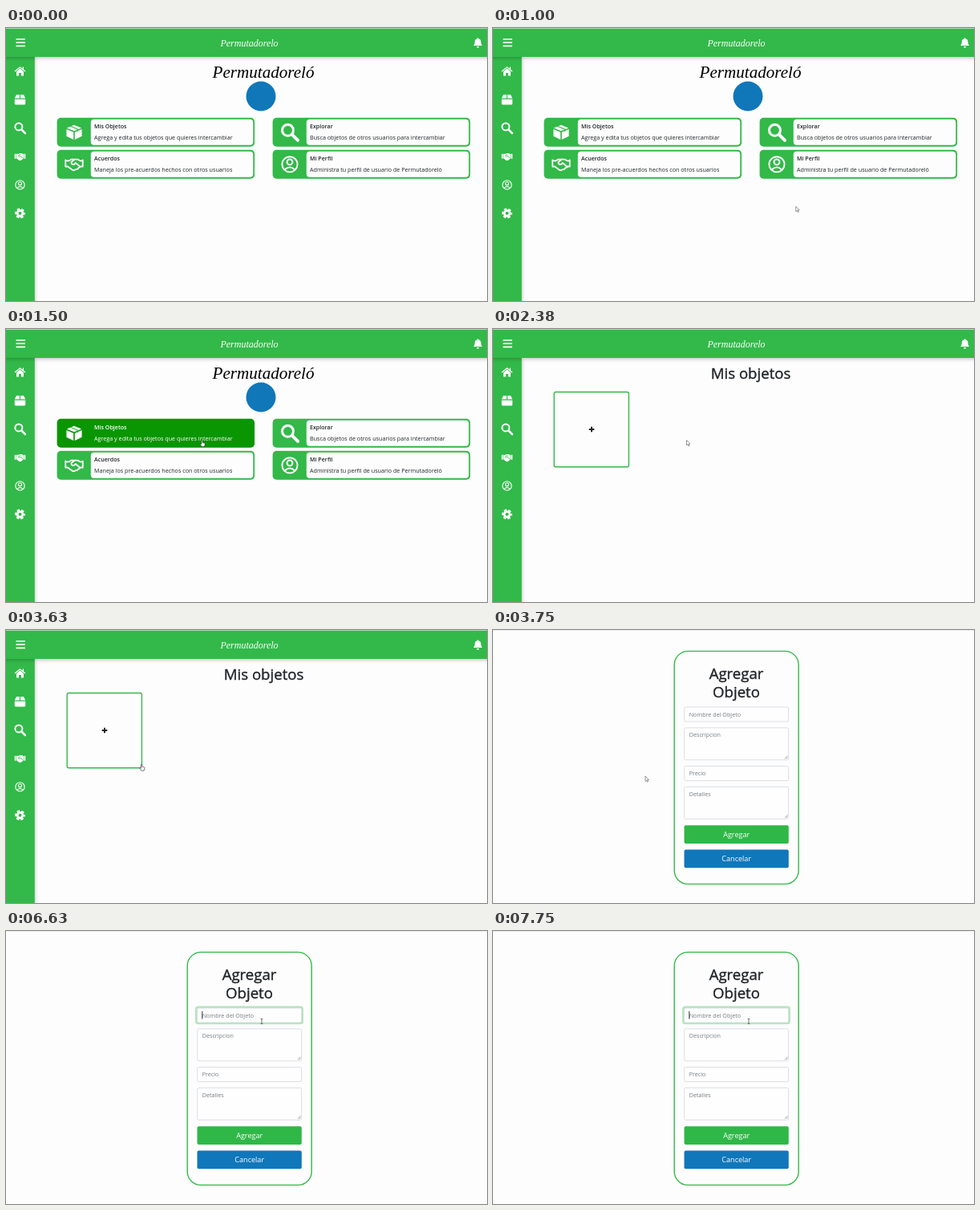
An HTML page that plays this animation: 600x340 px, repeating every 8 s.

```html
<!DOCTYPE html>
<html lang="es">
<head>
<meta charset="utf-8">
<title>Permutadorelo</title>
<style>
  html, body { margin: 0; width: 100%; height: 100%; overflow: hidden; background: #fdfdfd; }
  svg { display: block; width: 100%; height: 100%; }
  text { font: 7.2px "Open Sans", "Noto Sans", sans-serif; fill: #212529; }
  .brand { font: italic 21.1px "Liberation Serif", serif; fill: #000; text-anchor: middle; }
  .brand.small { font-size: 12px; fill: #fff; }
  .heading { font-size: 18.6px; text-anchor: middle; stroke: #212529; stroke-width: .4; }
  .label { font-size: 7.1px; font-weight: 600; }
  .hint { fill: #747b82; }
  .button { font-size: 9.1px; fill: #fff; text-anchor: middle; }
  .bar, .card { fill: #32b948; }
  .panel { fill: #fdfdfd; }
  .hover .card { fill: #0a9602; }
  .hover .panel { fill: none; }
  .hover text { fill: #fff; }
  .outline { fill: #fdfdfd; stroke: #32b948; stroke-width: 1.4; }
  .field { fill: #fefefe; stroke: #d3d7e0; stroke-width: .8; }
  .solid { fill: #fff; }
  .line { fill: none; stroke: #fff; stroke-width: 2; stroke-linejoin: round; stroke-linecap: round; }
</style>
</head>
<body>
<svg viewBox="0 0 600 340">
  <defs>
    <filter id="shadow" x="-20%" y="-20%" width="140%" height="140%">
      <feDropShadow dx="0" dy="1" stdDeviation="2.5" flood-opacity=".28"/>
    </filter>
    <!-- Icons are drawn around 0,0 in a 24 unit box -->
    <g id="home">
      <path class="line" d="M-11 0L0-9L11 0M7-9V-4"/>
      <path class="solid" d="M-8 1L0-6L8 1V10H2.5V4H-2.5V10H-8Z"/>
    </g>
    <g id="box">
      <path class="solid" d="M-8-11H-1V-3H-12ZM1-11H8L12-3H1ZM-12-1H12V9Q12 11 10 11H-10Q-12 11-12 9Z"/>
    </g>
    <g id="cube">
      <path class="solid" d="M0-11L11-6.5L0-2L-11-6.5ZM-11.5-4.5L-1-.2V11L-11.5 6ZM11.5-4.5L1-.2V11L11.5 6Z"/>
      <path d="M-5.5-9L5.5-4.3V-1" fill="none" stroke="#32b948" stroke-width="1.3"/>
    </g>
    <g id="search">
      <circle class="line" cx="-2.5" cy="-2.5" r="7" style="stroke-width:3"/>
      <path class="line" d="M3 3L10 10" style="stroke-width:4"/>
    </g>
    <g id="shakeSolid">
      <path class="solid" d="M-12-6H-9V5H-12ZM9-6H12V5H9ZM-8-6H-3L-1-7H4L8-5V4L2 9H-2L-8 4Z"/>
      <path d="M1-5L-4-1Q-2 2 1-1L7 4" fill="none" stroke="#32b948" stroke-width="1.5"/>
    </g>
    <g id="shake">
      <path class="line" d="M-12-6V3H-9L-2 8Q0 9 2 7L4 7L6 5L8 4L9 3H12V-6M-12-5H-7L-4-7H0M12-5H8L5-7H1L-4-3Q-4 1 0 0L2-2L8 3"/>
    </g>
    <g id="user">
      <circle class="line" r="10"/><circle class="line" cy="-3" r="3.6"/>
      <path class="line" d="M-6.5 7Q0 .5 6.5 7"/>
    </g>
    <g id="gear">
      <circle r="6" fill="none" stroke="#fff" stroke-width="5"/>
      <circle r="9.5" fill="none" stroke="#fff" stroke-width="4" stroke-dasharray="6 3.95" stroke-dashoffset="3"/>
    </g>
    <g id="bell">
      <path class="solid" d="M-10 7Q-7 4-7-2Q-7-8-1-9V-11H1V-9Q7-8 7-2Q7 4 10 7ZM-3 9H3Q2 12 0 12Q-2 12-3 9Z"/>
    </g>
    <g id="arrow">
      <path d="M0 0V6.4L1.5 5L2.6 7.3L3.6 6.8L2.5 4.7H4.4Z" fill="#fff" stroke="#555" stroke-width=".6"/>
    </g>
    <g id="hand">
      <path d="M-.7.5Q0-.5.7.5V3L3.3 3.6Q4 4 3.8 5L3 8H-.3L-2.4 5Q-2.2 4-.7 5Z" fill="#fff" stroke="#222" stroke-width=".6"/>
    </g>
    <g id="beam">
      <path d="M-1.3-3H1.3M0-3V3M-1.3 3H1.3" fill="none" stroke="#555" stroke-width=".8"/>
    </g>
  </defs>
  <rect width="600" height="340" fill="#fdfdfd"/>
  <g id="menuPage">
    <text class="brand" x="321" y="62">Permutadoreló</text>
    <circle cx="318" cy="85" r="18.5" fill="#1077b9"/>
  </g>
  <g id="objectsPage">
    <text class="heading" x="321.5" y="62">Mis objetos</text>
    <rect class="outline" x="76.2" y="78.5" width="93.2" height="93.2" rx="2"/>
    <path d="M119.7 125H126.3M123 121.7V128.3" stroke="#212529" stroke-width="2"/>
  </g>
  <g id="frame">
    <rect class="bar" y="36" width="35.8" height="310" filter="url(#shadow)"/>
    <rect class="bar" x="-10" y="-5" width="620" height="41" filter="url(#shadow)"/>
    <path d="M12.5 14H24M12.5 18.2H24M12.5 22.4H24" stroke="#fff" stroke-width="1.7"/>
    <text class="brand small" x="303.5" y="23">Permutadorelo</text>
  </g>
  <g id="formPage">
    <rect class="outline" x="226.2" y="26.4" width="155" height="290" rx="17"/>
    <text class="heading" x="303.5" y="61.3">Agregar</text>
    <text class="heading" x="303.5" y="84">Objeto</text>
    <rect id="glow" x="237.3" y="94.7" width="132.4" height="20.2" rx="2.5" fill="none" stroke="#b4e6bd" stroke-width="2.6"/>
  </g>
  <path d="M0 .5H600" stroke="#e4e6e5" opacity=".7"/>
  <path id="caret" d="M244.8 99.8V109.6" stroke="#222" stroke-width=".9"/>
  <use id="pointer"/>
</svg>
<script>
const LOOP = 8000, POINTER_AT = 500, OBJECTS_AT = 2370, FORM_AT = 3740, FOCUS_AT = 4500;
const $ = id => document.getElementById(id);
const add = (parent, markup) => parent.insertAdjacentHTML('beforeend', markup);
const icon = (id, x, y, size) =>
  `<use href="#${id}" transform="translate(${x} ${y}) scale(${size / 24})"/>`;

['home', 'box', 'search', 'shakeSolid', 'user', 'gear'].forEach((id, i) =>
  add($('frame'), icon(id, 17.5, 53.8 + i * 35.4, id === 'search' ? 15.5 : 13.5)));
add($('frame'), icon('bell', 588.6, 18.2, 13));

const cards = [
  [63.6, 111.8, 'cube', 20, 'Mis Objetos', 'Agrega y edita tus objetos que quieres intercambiar'],
  [332.6, 111.8, 'search', 24, 'Explorar', 'Busca objetos de otros usuarios para intercambiar'],
  [63.6, 151.8, 'shake', 21.5, 'Acuerdos', 'Maneja los pre-acuerdos hechos con otros usuarios'],
  [332.6, 151.8, 'user', 23, 'Mi Perfil', 'Administra tu perfil de usuario de Permutadoreló']
].map(([x, y, id, size, label, detail]) => {
  add($('menuPage'), `<g>
    <rect class="card" x="${x}" y="${y}" width="246.5" height="36" rx="5"/>
    <rect class="panel" x="${x + 42.2}" y="${y + 2}" width="202.5" height="32" rx="4"/>
    ${icon(id, x + 21.4, y + 18, size)}
    <text class="label" x="${x + 46.4}" y="${y + 13.5}">${label}</text>
    <text x="${x + 46.4}" y="${y + 27.5}">${detail}</text></g>`);
  return { x, y, w: 246.5, h: 36, node: $('menuPage').lastElementChild };
});

const fields = [
  ['Nombre del Objeto', 96, 18], ['Descripcion', 121.8, 40],
  ['Precio', 169.6, 18], ['Detalles', 195.3, 40]
].map(([hint, y, h]) => {
  const grip = h > 20 ? `<path d="M364 ${y + h - 1.5}l3.5-3.5M366 ${y + h - 1.5}l1.5-1.5" stroke="#777" stroke-width=".7"/>` : '';
  add($('formPage'), `<rect class="field" x="238.6" y="${y}" width="130" height="${h}" rx="1.8"/>
    ${grip}<text class="hint" x="244.7" y="${y + 11.6}">${hint}</text>`);
  return { x: 238, y, w: 131, h };
});

[['Agregar', 243.3, '#2fb848'], ['Cancelar', 273.6, '#1077ba']].forEach(([label, y, color]) =>
  add($('formPage'), `<rect x="238.5" y="${y}" width="130.3" height="22.6" rx="2" fill="${color}"/>
    <text class="button" x="303.7" y="${y + 14.7}">${label}</text>`));

// Pointer stops: time, x, y
const stops = [
  [0, 377.8, 222.2], [1050, 377.8, 222.2], [1500, 244.5, 138.5], [OBJECTS_AT, 244.5, 138.5],
  [2380, 241.5, 138.5], [2750, 205, 210], [3200, 145, 150], [3500, 145, 150],
  [3750, 190, 182], [3880, 245, 160], [4250, 319, 112.5], [LOOP, 319, 112.5]
];
const addBox = { x: 76, y: 78, w: 94, h: 94 };
const inside = (b, x, y) => x >= b.x && x <= b.x + b.w && y >= b.y && y <= b.y + b.h;
const show = (id, on) => $(id).style.display = on ? '' : 'none';

function pointerAt(t) {
  const i = stops.findIndex(s => t < s[0]);
  const [t0, x0, y0] = stops[i - 1], [t1, x1, y1] = stops[i];
  const k = (t - t0) / (t1 - t0), e = k * k * (3 - 2 * k);
  return [x0 + (x1 - x0) * e, y0 + (y1 - y0) * e];
}

function caretOn(t) {
  return t >= FOCUS_AT && t < 5000 || t >= 5500 && t < 6130 ||
    t >= 6630 && t < 7130 || t >= 7630;
}

function draw() {
  const t = performance.now() % LOOP;
  const menu = t < OBJECTS_AT, form = t >= FORM_AT;
  show('menuPage', menu);
  show('objectsPage', !menu && !form);
  show('frame', !form);
  show('formPage', form);
  show('caret', caretOn(t));
  $('glow').style.opacity = Math.min(1, Math.max(0, (t - FOCUS_AT) / 150));

  const [x, y] = pointerAt(t);
  const over = box => inside(box, x, y);
  cards.forEach(card => card.node.classList.toggle('hover', over(card)));
  const link = menu ? cards.some(over) : !form && over(addBox);
  const kind = link ? 'hand' : form && fields.some(over) ? 'beam' : 'arrow';
  show('pointer', t >= POINTER_AT);
  $('pointer').setAttribute('href', '#' + kind);
  $('pointer').setAttribute('transform', `translate(${x} ${y})`);
  requestAnimationFrame(draw);
}
draw();
</script>
</body>
</html>
```
